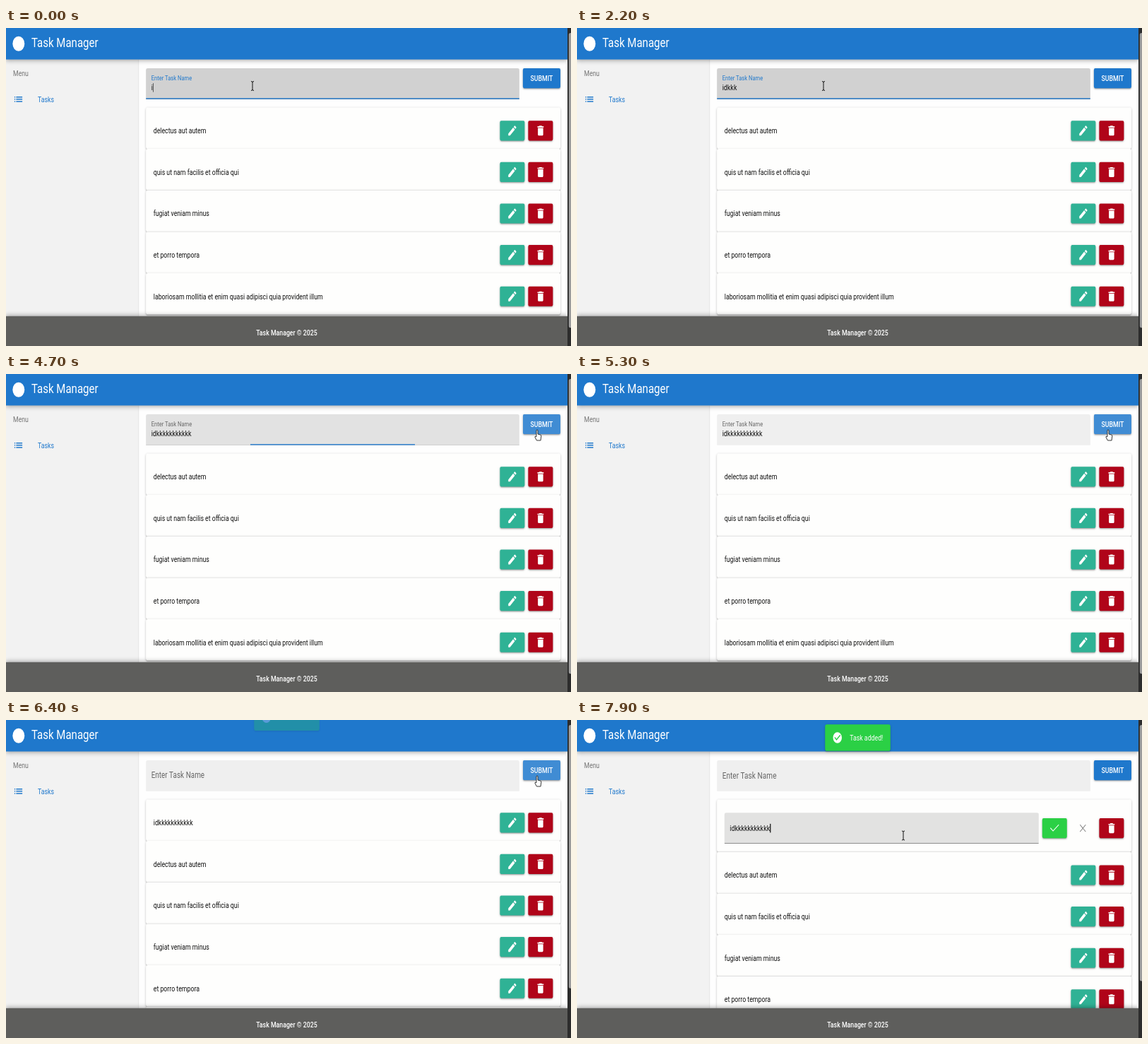
Write an HTML page that moves like this. It is 800 px wide and 450 px high and loops after 8 s.

```html
<!DOCTYPE html>
<html lang="en">
<head>
<meta charset="utf-8">
<title>Task Manager</title>
<style>
html, body { margin: 0; width: 100%; height: 100%; overflow: hidden; }
/* a 1280 x 576 page shown on an 800 x 450 stage */
#page { position: absolute; width: 1280px; height: 576px; overflow: hidden; background: #fefefe;
  transform: scale(.625, .78125); transform-origin: 0 0; font: 14px/20px Roboto, sans-serif; color: #111; }
#page div, #page header, #page footer, #page aside { position: absolute; box-sizing: border-box; white-space: pre; }
header { width: 1272px; height: 57px; background: #1f78cc; color: #fff;
  box-shadow: 0 0 10px 2px rgba(0,0,0,.2), 0 0 10px rgba(0,0,0,.24); }
.logo { left: 15px; top: 14.5px; width: 27px; height: 27px; border-radius: 50%; background: #fff; }
.title { left: 57.6px; top: 11px; font-size: 24px; line-height: 32px; }
aside { top: 57px; width: 301px; height: 470px; background: #f2f2f2; border-right: 1px solid #ddd; color: #1f78cc; }
footer { top: 521.5px; width: 1272px; height: 55px; background: #5e5e5c; color: #fff; text-align: center;
  font-weight: 500; line-height: 61px; box-shadow: 0 0 10px 2px rgba(0,0,0,.2), 0 0 10px rgba(0,0,0,.24); }
.field { height: 56px; border-radius: 4px 4px 0 0; letter-spacing: .00937em; overflow: hidden; }
#field { left: 317px; top: 73px; width: 846px; }
#label { left: 12px; top: 18px; font-size: 16px; transform-origin: 0 0; }
#line { left: 0; bottom: 0; width: 100%; height: 2px; background: #1f78cc; }
#typed { left: 12px; top: 25px; }
.caret { display: inline-block; width: 1.5px; height: 16px; background: #111; vertical-align: -3px; }
.btn { height: 36px; width: 56px; border-radius: 3px; color: #fff; }
.btn, .row { box-shadow: 0 1px 5px rgba(0,0,0,.2), 0 2px 2px rgba(0,0,0,.14), 0 3px 1px -2px rgba(0,0,0,.12); }
.btn svg { position: absolute; left: 16px; top: 6px; }
.hover { background-image: linear-gradient(#ffffff26, #ffffff26); }
#submit { left: 1171px; top: 73px; width: 85px; background-color: #1f78cc; text-align: center; line-height: 36px; font-weight: 500; }
#list { left: 317px; top: 143.5px; width: 939px; }
#list .row { position: relative; height: 75px; border-radius: 4px; background: #fefefd; }
.name { left: 17px; top: 32px; }
.edit { left: 802px; top: 24px; background-color: #2fb295; }
.delete { left: 866px; top: 24px; background-color: #b00419; }
.editor { display: none; }
#list .editing { height: 95px; }
.editing .name, .editing .edit { display: none; }
.editing .delete { top: 34px; }
.editing .editor { display: block; }
#rename { left: 17px; top: 24px; width: 712px; }
#rename .value { left: 12px; top: 18px; }
.save { left: 737px; top: 34px; background: #2bd045; }
#page .cancel { left: 801px; top: 34px; color: #888; box-shadow: none; }
#toast { left: 562px; top: 7.5px; width: 148px; height: 48px; border-radius: 4px; background: #2bd045; color: #fff;
  box-shadow: 0 1px 5px rgba(0,0,0,.2), 0 2px 2px rgba(0,0,0,.14); }
#toast svg { position: absolute; left: 16px; top: 12px; }
.track { left: 1272px; width: 8px; height: 576px; background: #2c2c2c; }
#thumb { left: 3px; top: 9px; width: 7px; border-radius: 4px; background: #9c9c9c; }
#mouse { position: absolute; left: 0; top: 0; }
</style>
</head>
<body>
<div id="page">
  <div id="field" class="field">
    <div id="label">Enter Task Name</div>
    <div id="typed"><span id="text"></span><span id="caret" class="caret"></span></div>
    <div id="line"></div>
  </div>
  <div id="submit" class="btn">SUBMIT</div>
  <div id="list"></div>
  <aside>
    <div style="left:16px;top:14.5px;color:#757575">Menu</div>
    <div style="left:16px;top:59.5px" data-icon="list"></div>
    <div style="left:72px;top:61.5px">Tasks</div>
  </aside>
  <footer>Task Manager © 2025</footer>
  <header><div class="logo"></div><div class="title">Task Manager</div></header>
  <div id="toast"><span data-icon="done"></span><div style="left:56px;top:14px">Task added!</div></div>
  <div class="track"><div id="thumb"></div></div>
</div>
<svg id="mouse" width="800" height="450">
  <g id="pointer" stroke-linejoin="round">
    <path id="arrow" d="M0 0V12.5L2.2 10.3 4 15 5.7 14 4 9.4H7.2Z" fill="#111" stroke="#fff" stroke-width=".7"/>
    <path id="hand" d="M-1 .6Q0-.8 1 .6V6L5 7.2Q6 7.6 5.8 9L5 15H-.6L-3 10.5Q-3.6 8.6-1 9.6Z" fill="#fff" stroke="#222" stroke-width=".9"/>
    <path id="beam" d="M-2-6.5Q0-6.5 0-5 0-6.5 2-6.5M0-5V5M-2 6.5Q0 6.5 0 5 0 6.5 2 6.5" fill="none" stroke="#111"/>
  </g>
</svg>
<script>
const icons = {
  edit: 'M3 17.25V21h3.75L17.81 9.94l-3.75-3.75L3 17.25zM20.71 7.04a1 1 0 0 0 0-1.41l-2.34-2.34a1 1 0 0 0-1.41 0l-1.83 1.83 3.75 3.75 1.83-1.83z',
  delete: 'M6 19c0 1.1.9 2 2 2h8c1.1 0 2-.9 2-2V7H6v12zM19 4h-3.5l-1-1h-5l-1 1H5v2h14V4z',
  list: 'M3 13h2v-2H3zm0 4h2v-2H3zm0-8h2V7H3zm4 4h14v-2H7zm0 4h14v-2H7zM7 7v2h14V7z',
  done: 'M12 2a10 10 0 1 0 0 20 10 10 0 0 0 0-20zm-2 15l-5-5 1.4-1.4 3.6 3.6 7.6-7.6L19 8z',
  save: 'M2 12l6.5 6L22 6l-1-1L8.5 16 3 11z',
  cancel: 'M5 6l1-1 6 6 6-6 1 1-6 6 6 6-1 1-6-6-6 6-1-1 6-6z'
};
const $ = id => document.getElementById(id);
const icon = name => `<svg width="24" height="24" viewBox="0 0 24 24"><path fill="currentColor" fill-rule="evenodd" d="${icons[name]}"/></svg>`;
const button = (name, extra = '') => `<div class="btn ${name} ${extra}">${icon(name)}</div>`;

const word = 'id' + 'k'.repeat(11);
const tasks = [word, 'delectus aut autem', 'quis ut nam facilis et officia qui', 'fugiat veniam minus',
  'et porro tempora', 'laboriosam mollitia et enim quasi adipisci quia provident illum'];
$('list').innerHTML = tasks.map(task =>
  `<div class="row"><div class="name">${task}</div>${button('edit')}${button('delete')}</div>`).join('');
const first = $('list').firstChild;
first.insertAdjacentHTML('beforeend',
  `<div id="rename" class="field editor"><div class="value">${word}<span id="caret2" class="caret"></span></div></div>`
  + button('save', 'editor') + button('cancel', 'editor'));
const firstEdit = first.querySelector('.edit');
document.querySelectorAll('[data-icon]').forEach(el => el.innerHTML = icon(el.dataset.icon));

// event times in ms
const LOOP = 8000, SPELL = 3650, BLUR = 4510, ADDED = 6030, NOTIFY = 6110, EDIT = 7350, FOCUS = 7850;
const keys = [-100, 500, 900, 1200, 1500, ...Array.from({ length: 8 }, (_, i) => 2400 + 140 * i)];
const path = [[3620, 349, 82], [3860, 769, 32], [4000, 769, 32], [4400, 752, 79],
  [6500, 752, 79], [6900, 714, 150], [7480, 714, 150], [7800, 462, 163.5]];

const mix = (a, b, p) => a + (b - a) * p;
const ease = p => p < .5 ? 2 * p * p : 1 - 2 * (1 - p) ** 2;
const progress = (t, start, length) => ease(Math.min(1, Math.max(0, (t - start) / length)));
const show = (el, on) => el.style.display = on ? '' : 'none';

function mouseAt(t) {
  let [, x, y] = path[0];
  for (let i = 1; i < path.length; i++) {
    const [start] = path[i - 1], [end, nx, ny] = path[i], p = progress(t, start, end - start);
    x = mix(x, nx, p);
    y = mix(y, ny, p);
  }
  return [x, y];
}

function render(t) {
  const [x, y] = mouseAt(t);
  const over = (l, top, r, b) => x >= l && x <= r && y >= top && y <= b;
  const added = t >= ADDED, editing = t >= EDIT;

  // new task field
  const focus = 1 - progress(t, BLUR, 360), focused = t < BLUR;
  const typed = keys.filter(k => k <= t);
  $('text').textContent = added ? '' : word.slice(0, typed.length);
  $('text').style.textDecoration = focused && t >= SPELL ? 'underline wavy #d22 1px' : '';
  show($('caret'), focused && (t - typed[typed.length - 1]) % 1000 < 500);
  $('field').style.background = `rgba(0,0,0,${mix(.059, .176, focus)})`;
  $('field').style.boxShadow = `inset 0 -1px rgba(0,0,0,${.42 * focus})`;
  $('line').style.transform = `scaleX(${focus})`;
  const drop = progress(t, NOTIFY, 360);
  $('label').style.transform = `translateY(${mix(-8, 0, drop)}px) scale(${mix(.75, 1, drop)})`;
  $('label').style.color = focused ? '#1f78cc' : '#666';

  // list
  show(first, added);
  first.classList.toggle('editing', editing);
  const overRename = editing && over(209, 131, 654, 174);
  $('rename').style.background = `rgba(0,0,0,${overRename ? .11 : .059})`;
  $('rename').style.boxShadow = overRename ? 'inset 0 -1px rgba(0,0,0,.5)' : '';
  show($('caret2'), t >= FOCUS);
  $('thumb').style.height = (editing ? 464 : added ? 477 : 534) + 'px';

  // notification
  const slide = progress(t, NOTIFY, 800);
  $('toast').style.transform = `translateY(${mix(-50, 0, slide)}px)`;
  $('toast').style.opacity = slide;

  // mouse
  const overSubmit = over(732, 57, 785, 85);
  const overEdit = !editing && over(699, 131, 734, 159);
  const overTools = editing && over(659, 138, 775, 167);
  $('submit').classList.toggle('hover', overSubmit);
  firstEdit.classList.toggle('hover', overEdit);
  const kind = overSubmit || overEdit || overTools ? 'hand'
    : overRename || over(198, 57, 727, 100) ? 'beam' : 'arrow';
  for (const id of ['arrow', 'hand', 'beam']) show($(id), id === kind);
  $('pointer').setAttribute('transform', `translate(${x} ${y})`);
}

function tick() {
  render(performance.now() % LOOP);
  requestAnimationFrame(tick);
}
tick();
</script>
</body>
</html>
```
